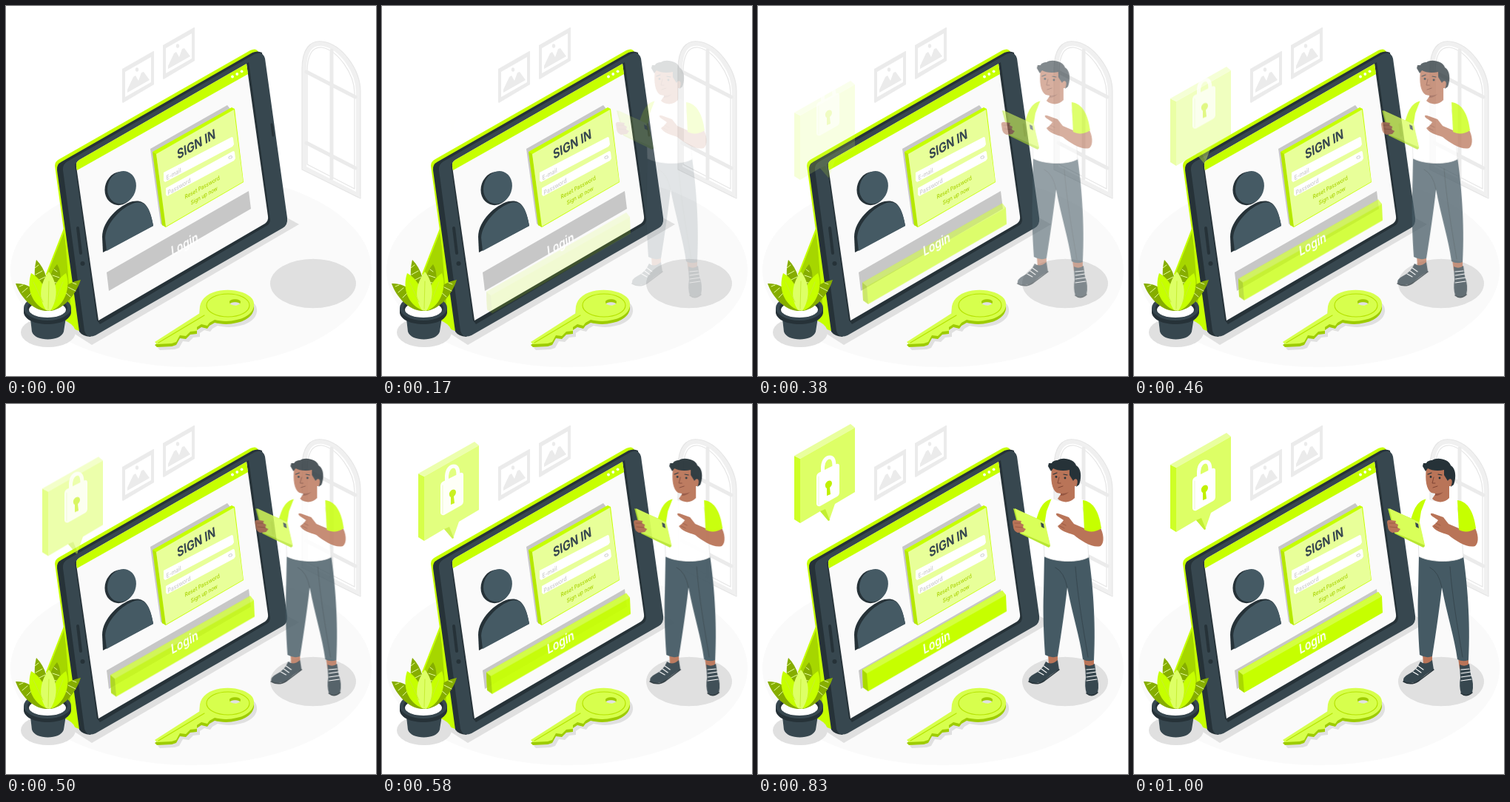
Write an HTML page that moves like this. It is 500x500 px and loops after 1.04 s.

```html
<!DOCTYPE html>
<html lang="en">
<head>
<meta charset="utf-8">
<title>Sign in</title>
<style>
  html, body { margin: 0; width: 100%; height: 100%; overflow: hidden; background: #fff; }
  svg { display: block; width: 100%; height: 100%; }
  text { font-family: Inter, Roboto, sans-serif; }
  .lime { fill: #c6ff00; }
  .pale { fill: #ddff66; }
  .deep { fill: #86ad00; }
  .slate { fill: #37474f; }
  .steel { fill: #455a64; }
  .ink { fill: #263238; }
  .skin { fill: #b97458; }
  .shade { fill: #e0e0e0; }
  .white { fill: #fff; }
  .line { fill: none; stroke-linecap: round; stroke-linejoin: round; }
</style>
</head>
<body>
<svg viewBox="0 0 500 500">
  <defs>
    <g id="picture">
      <path fill="#ebebeb" d="M0 24 42 0 43 0V45L1 70 0 69Z"/>
      <path fill="#fff" d="M4 28 39 8V42L4 62Z"/>
      <path fill="#ebebeb" d="M7 56V52L15 35 18 33 22 40 26 29 29 28 37 39V39Z"/>
      <ellipse fill="#ebebeb" cx="20" cy="25" rx="2.2" ry="2.8"/>
    </g>
    <path id="keyShape" fill-rule="evenodd" d="M201 454 262 415C260 402 266 392 280 387C299 380 325 385 333 396C340 408 329 421 312 424C301 427 290 426 282 424L275 428 272 432 264 430 258 434 258 439 249 440 243 446 235 445 230 454 224 456 204 457ZM302 400C302 406 317 406 317 400C317 395 302 395 302 400Z"/>
  </defs>

  <!-- room -->
  <ellipse cx="250" cy="357" rx="244" ry="131" fill="#fafafa"/>
  <use href="#picture" x="157" y="61"/>
  <use href="#picture" x="212" y="29"/>
  <g class="line" stroke-linecap="butt">
    <path stroke="#f0f0f0" stroke-width="6" d="M403 219V86C403 60 412 49 428 51C452 55 476 87 476 117V256Z"/>
    <path stroke="#e6e6e6" stroke-width="1.2" d="M407 214V89C407 66 414 55 427 56C448 60 471 91 471 118V247L407 214Z M400 220V85C400 57 412 46 427 48C454 51 479 86 479 116V260L400 221"/>
    <path stroke="#ebebeb" stroke-width="5" d="M440 60V233M406 89 472 123M406 185 472 219"/>
  </g>
  <ellipse class="shade" cx="415" cy="375" rx="58" ry="33.3"/>

  <!-- tablet on its stand -->
  <path class="shade" d="M82 436 116 458 396 295 374 283Z"/>
  <path class="lime" d="M79 298 54 362 80 432 104 441 84 300Z"/>
  <path fill="#a6d600" d="M79 304 56 362 88 413Z"/>
  <path class="lime" d="M66 216Q66 210 72 207L330 60Q338 56 341 62L352 100 110 441 96 434Z"/>
  <path class="ink" d="M69 222Q68 214 75 210.500L333 63Q340 60 346 63L352 120 114 447Q103 446 99 440Z"/>
  <path class="slate" d="M77 222Q76 214 83 210L336 65Q347 60 350 71L380 286Q381 296 374 300L121 445Q109 450 106 439Z"/>
  <path class="ink" d="M93 214 328 76 357 289Q357 294 352 297L127 430 123 425Z"/>
  <path fill="#fafafa" d="M95 217Q94 211 99 208L325 78 354 284Q355 290 350 294L125 425Z"/>
  <path class="lime" d="M96 222 95 217Q94 211 99 208L325 78 327 92Z"/>
  <g class="white">
    <circle cx="306" cy="95.500" r="1.900"/>
    <circle cx="312.300" cy="92" r="1.900"/>
    <circle cx="318.600" cy="88.300" r="1.900"/>
  </g>
  <path class="line" stroke="#263238" stroke-width="4" d="M97 300 101 334"/>
  <circle class="ink" cx="103.500" cy="348" r="3"/>
  <path class="line" stroke="#263238" stroke-width="3" d="M359 160 361 175"/>

  <!-- avatar -->
  <ellipse class="ink" cx="154" cy="246.500" rx="20" ry="23" transform="rotate(20 154 246)"/>
  <ellipse class="steel" cx="156.500" cy="245" rx="19" ry="22.500" transform="rotate(20 156 245)"/>
  <path class="ink" d="M131 333 130 312C130 290 153 269 171 264C187 261 194 270 199 297Z"/>
  <path class="steel" d="M136 331 134 313C135 293 157 271 174 266C189 262 195 275 199 297Z"/>

  <!-- sign-in card -->
  <path fill="#c7c7c7" d="M195 193 299 134 303 139 212 297 209 294Z"/>
  <path class="lime" d="M198 197 305 137 309 139 321 238 216 299 211 296Z"/>
  <path fill="#9fcc00" d="M198 197 203 200 216 299 211 296Z" opacity=".45"/>
  <path fill="#e8ff99" d="M203 200 308 140 320.500 237.500 216 298Z"/>
  <path class="white" d="M213 225 305 177Q307 177 307 179L308 187 306 190 215 238 213 236Z"/>
  <path class="white" d="M216 246 307 196Q309 196 309 198L310 206 308 209 218 257 216 255Z"/>
  <ellipse class="line" stroke="#d0d0d0" cx="303" cy="204.500" rx="2.400" ry="1.600" transform="rotate(-25 303 204)"/>
  <g id="cardText"></g>

  <!-- login button -->
  <path fill="#c7c7c7" d="M136 360 328 250 331 274 139 385Z"/>
  <g id="button">
    <path class="lime" d="M141 361 330 254 335 260 336 282 149 390 142 385Z"/>
    <path fill="#d4ff40" d="M141 361 330 254 335 260 147 366Z"/>
    <path fill="#a9d900" d="M141 361 147 366 149 390 142 385Z"/>
  </g>
  <g id="buttonText"></g>

  <!-- key -->
  <use href="#keyShape" class="shade" x="4" y="8"/>
  <use href="#keyShape" fill="#9ecc00" y="4"/>
  <use href="#keyShape" fill="#d7ff4d"/>
  <g class="line" stroke="#b5e300" stroke-width="1.200">
    <ellipse cx="300" cy="404.500" rx="29" ry="15.500"/>
    <path d="M206 455 268 418"/>
  </g>

  <!-- plant -->
  <ellipse class="shade" cx="57" cy="441" rx="37" ry="20"/>
  <path class="slate" d="M32 414 35 440C39 454 74 454 78 440L82 414Z"/>
  <path class="ink" d="M24 408V415C28 435 84 435 88 415V408Z"/>
  <ellipse class="slate" cx="56" cy="408" rx="32" ry="17"/>
  <ellipse class="ink" cx="56" cy="408" rx="27" ry="13"/>
  <ellipse class="white" cx="56" cy="410.500" rx="25" ry="10.500"/>
  <g class="deep">
    <path d="M53 412C36 411 19 393 13 375C33 374 51 390 56 412Z"/>
    <path d="M59 412C75 411 93 394 101 370C80 374 64 389 56 412Z"/>
    <path d="M54 398C39 385 36 363 41 343C53 355 59 374 58 398Z"/>
    <path d="M57 398C55 376 59 360 69 349C77 361 74 386 63 400Z"/>
  </g>
  <path class="line" stroke="#e6ff99" d="M18 379 23 377M22 387 29 381M28 394 35 387M95 376 90 374M94 385 84 380M87 393 79 386M39 354 44 350M40 363 49 358M43 371 53 366M65 356 69 359M63 364 72 367M62 373 73 375"/>
  <path class="lime" d="M54 411C35 403 27 382 34 361C49 369 58 389 58 411Z"/>
  <path class="lime" d="M57 411C59 390 66 371 81 361C88 381 79 403 63 411Z"/>
  <path class="pale" d="M54 411C43 395 46 374 58 359C71 375 70 397 60 412Z"/>
  <path class="line" stroke="#c6ee33" d="M57 409 58 372M37 373 50 400M77 373 66 400"/>

  <!-- speech bubble and padlock -->
  <g id="bubble">
    <path class="lime" d="M49 82 57 86V173L49 168Z" fill-opacity=".85"/>
    <path fill="#e9ff9e" d="M49 82 125 39 131 44 57 86Z"/>
    <path class="pale" d="M57 86 131 44V131L104 147 96 170 84 157 57 173Z"/>
    <path fill="#c2ef32" d="M84 157 91 154 97 169 95 170Z"/>
  </g>
  <g id="lock">
    <path class="line" stroke="#fff" stroke-width="5" d="M87.500 103V91C88 82 93 78 97 78C102 78 103 83 103 91V95"/>
    <path class="white" d="M79 105Q79 101 82 99L106 87Q110 86 110 90V126Q110 129 107 131L84 144Q80 145 79 141Z"/>
    <g id="keyhole">
      <path class="line" stroke="#edf7cf" d="M82 104V142"/>
      <path fill="#c0f000" d="M91 117C90 111 99 106 100 113C100 116 98 118 97 119L98 128 93 130 93 120Q91 119 91 117Z"/>
    </g>
  </g>

  <!-- visitor -->
  <g id="visitor">
    <path class="skin" d="M391 338 404 338 404 352 392 353ZM439 343 453 343 453 358 441 358Z"/>
    <path class="slate" d="M388 348Q395 354 404 346L406 359Q395 365 386 374Q374 380 365 375Q364 369 372 365Q383 360 388 348Z"/>
    <path class="slate" d="M441 352Q448 356 454 351L456 365Q461 379 458 390Q450 397 443 391Q440 382 442 370Z"/>
    <path class="line" stroke="#fff" stroke-width="1.100" d="M385 354 392 359M382 358 389 363M378 362 385 366M443 359 454 358M443 364 456 362M443 369 457 367M443 374 457 372"/>
    <path class="line" stroke="#263238" stroke-width="1.500" d="M365 375Q375 381 386 374L406 359M443 391Q450 397 458 390"/>
    <path class="steel" d="M386 203 446 205C451 240 456 292 453 346Q445 349 438 345C434 315 424 285 417 248C414 275 409 310 404 341Q396 344 387 339C385 310 384 280 385 255Z"/>
    <path class="line" stroke="#37474f" d="M417 248Q413 227 401 221M428 220C431 260 438 300 445 342"/>

    <path class="lime" d="M397 128C383 131 379 143 375 157L386 172 391 150Z"/>
    <path class="white" d="M396 127C406 134 420 133 428 125L442 131 443 165 446 207C432 215 400 214 386 206L385 170 389 145Z"/>
    <path class="line" stroke="#e0e0e0" stroke-width=".8" d="M386 206C400 214 432 215 446 207L443 165 438 140M386 206 385 180"/>
    <path class="skin" d="M407 112 427 107 427 127C421 134 410 134 404 128L408 122Z"/>
    <path fill="#955641" d="M408 118 421 116Q416 124 408 124Z"/>
    <path class="skin" d="M396 87C406 80 424 84 428 98C437 98 434 112 427 111C423 119 414 123 403 120C396 116 394 102 396 87Z"/>
    <path class="ink" d="M395 91 391 84 392 80 396 80C397 77 401 76 404 76C411 71 427 75 429 83C437 88 436 101 433 109L429 112C434 100 427 99 425 104L420 96 420 89C412 91 403 90 398 87Z"/>
    <g class="ink">
      <circle cx="402" cy="98.500" r="1.400"/>
      <circle cx="414" cy="100" r="1.400"/>
    </g>
    <path class="line" stroke="#263238" stroke-width="1.200" d="M398 95 403 93M412 95 417 96"/>
    <path class="line" stroke="#7f4534" d="M406 99 404 107 408 107M405 113 411 111"/>

    <path class="skin" d="M440 169 461 166C466 174 468 187 462 192C452 195 437 186 426 177C417 174 407 171 404 165L409 161 412 157 403 151Q400 147 405 148L419 153 426 162 447 171Z"/>
    <path class="line" stroke="#955641" stroke-width=".8" d="M409 161 415 164M407 165 413 168"/>
    <path class="lime" d="M438 130C453 132 460 147 463 168C456 173 447 174 440 170Z"/>

    <path fill="#b8e632" d="M344 141 386 159 394 192 392 194 353 175Z"/>
    <path fill="#d9ff59" d="M346 141 387 160 394 191 354 174Z"/>
    <path class="slate" d="M381 160 385 162 386 168 382 166Z"/>
    <path class="skin" d="M343 160Q343 156 348 157L355 158 354 161 358 163 357 167 361 169 358 173 350 174Q344 171 344 166Z"/>
    <path class="line" stroke="#955641" stroke-width=".8" d="M346 161 354 161M347 166 357 167"/>
  </g>
</svg>
<script>
  const $ = id => document.getElementById(id);

  // Text lies on the tilted screen plane.
  function label(parent, str, x, y, size, color, weight) {
    const t = document.createElementNS('http://www.w3.org/2000/svg', 'text');
    t.textContent = str;
    t.setAttribute('transform', `matrix(.866 -.49 .13 1.1 ${x} ${y})`);
    t.setAttribute('font-size', size);
    t.setAttribute('font-weight', weight);
    t.setAttribute('fill', color);
    $(parent).append(t);
  }
  label('cardText', 'SIGN IN', 232, 207.5, 16, '#37474f', 650);
  label('cardText', 'E-mail', 217, 235.5, 7.6, '#cacaca', 500);
  label('cardText', 'Password', 219, 255.5, 7.6, '#cacaca', 500);
  label('cardText', 'Reset Password', 242, 261, 7.1, '#a9d400', 500);
  label('cardText', 'Sign up now', 250, 269, 7.1, '#a9d400', 500);
  label('buttonText', 'Login', 224, 338, 15.6, '#fff', 600);

  const STEPS = 25, LOOP = 1040;

  // cubic-bezier(.36, -.01, .5, 1.38) over one second
  function ease(x) {
    if (x >= 1) return 1;
    let lo = 0, hi = 1;
    for (let i = 0; i < 30; i++) {
      const s = (lo + hi) / 2;
      if (1.08 * s - .66 * s * s + .58 * s ** 3 < x) lo = s; else hi = s;
    }
    return -.03 * lo + 4.2 * lo * lo - 3.17 * lo ** 3;
  }
  const progress = step => ease((step + 1) / 24);
  const fade = step => step < 2 ? 0 : Math.min(1, progress(step));

  // Drop of the bubble below rest: [step, offset]
  const rise = [[0, 90], [6, 77], [9, 62], [11, 43], [14, 12], [17, -7], [20, -12], [24, 0]];
  function drop(step) {
    const i = Math.min(rise.length - 2, rise.findLastIndex(r => r[0] <= step));
    const slope = j => {
      const a = rise[Math.max(0, j - 1)], b = rise[Math.min(rise.length - 1, j + 1)];
      return (b[1] - a[1]) / (b[0] - a[0]);
    };
    const [x0, y0] = rise[i], [x1, y1] = rise[i + 1];
    const w = x1 - x0, u = (step - x0) / w, v = 1 - u;
    return v * v * (1 + 2 * u) * y0 + u * u * (3 - 2 * u) * y1 +
      w * u * v * (v * slope(i) - u * slope(i + 1));
  }

  function play(id, pose) {
    const frames = Array.from({ length: STEPS + 1 }, (_, n) => {
      const step = Math.min(n, STEPS - 1);
      const [x, y, opacity] = pose(step);
      return {
        offset: n === STEPS ? 1 : Math.max(0, n / STEPS - 4 / LOOP),
        transform: `translate(${x}px, ${y}px)`,
        opacity,
        easing: 'steps(1, end)'
      };
    });
    $(id).animate(frames, { duration: LOOP, iterations: Infinity });
  }
  play('visitor', k => [-31 * (1 - progress(k)) - 1, 0, fade(k)]);
  play('button', k => [0, 30 * (1 - progress(k)), fade(k)]);
  play('bubble', k => [0, drop(k), fade(k) ** 3]);
  play('lock', k => [0, drop(k) / 2, fade(k)]);
  play('keyhole', k => [0, 0, fade(k) ** 2]);
</script>
</body>
</html>
```
